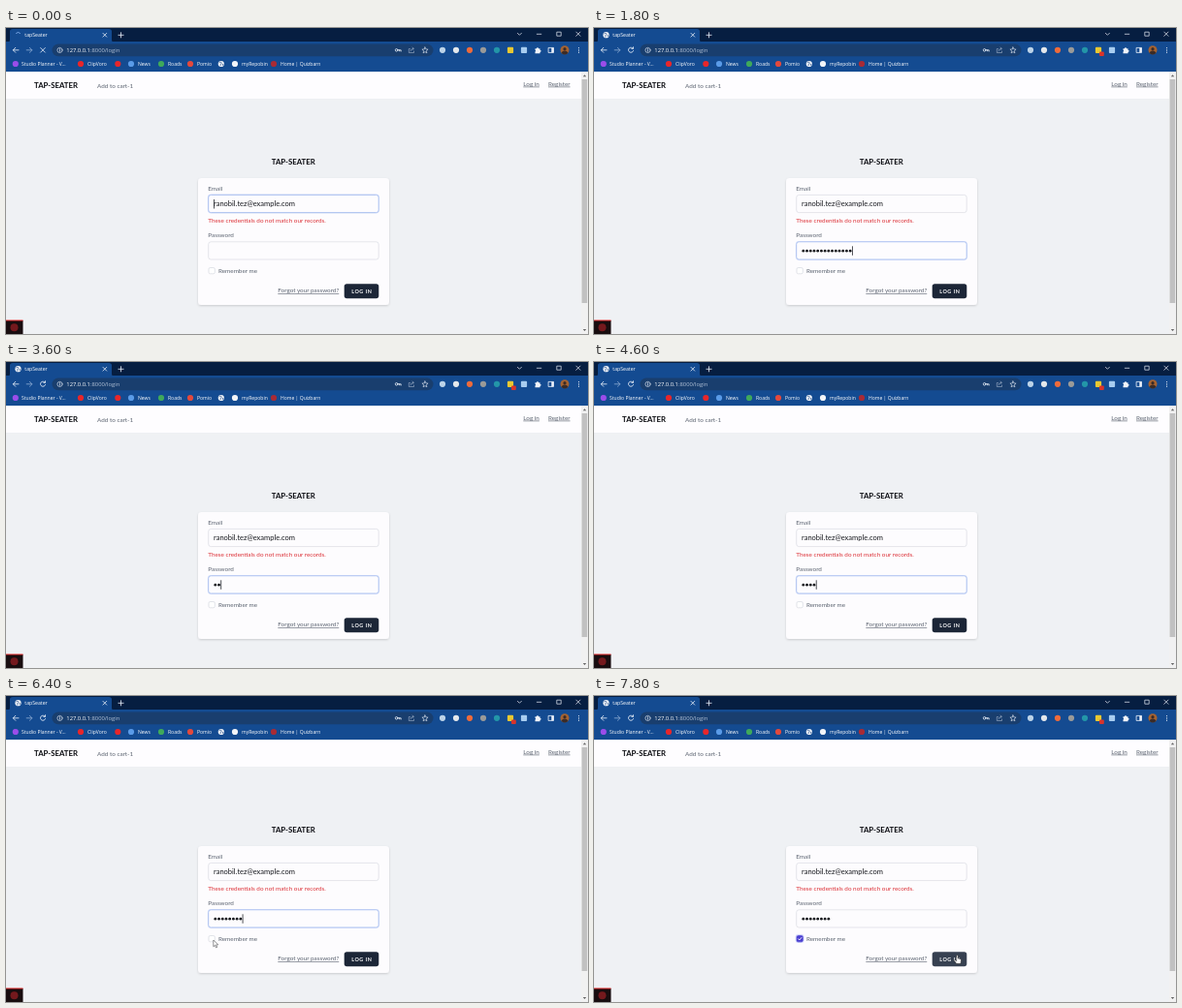
Recreate the animation shown at these times as an HTML page. Size 600x316 px, loop 8000 ms.

```html
<!DOCTYPE html>
<html lang="en">
<head>
<meta charset="utf-8">
<title>Login form</title>
<style>
html, body { margin: 0; width: 100%; height: 100%; overflow: hidden; background: #eff1f4; }
svg { display: block; width: 600px; height: 316px; }
text { font: 6.33px Lato, "Open Sans", sans-serif; fill: #5b6370; white-space: pre; }
.ui text { font: 500 5.05px "Open Sans", "Noto Sans", sans-serif; fill: #fff; }
.ui .tab { font-size: 5.2px; }
.ui .url { font-size: 5.84px; }
.line { fill: none; stroke: #eef3fb; stroke-width: .8; stroke-linecap: round; stroke-linejoin: round; }
.brand { font-size: 7.8px; font-weight: 700; fill: #0c0d12; }
.link { text-decoration: underline; text-decoration-thickness: .45px; }
.field { fill: #fdfcfe; stroke: #d3d6de; stroke-width: .6; }
.focus { stroke: #a9bff0; stroke-width: .9; }
.filled { fill: #e6eefb; }
</style>
</head>
<body>
<svg viewBox="0 0 600 316">
  <defs>
    <filter id="shadow" x="-5%" y="-5%" width="110%" height="115%">
      <feDropShadow dx="0" dy="1" stdDeviation="1.1" flood-opacity=".16"/>
    </filter>
    <g id="globe">
      <circle r="3.1" fill="#f4f7fb"/>
      <path d="M-2.3-1.2-.3-2 .6-.6-.8.3-.4 1.6-1.4 2M1 .6 2.2.4 1.5 1.9" fill="none" stroke="#3c5f96" stroke-width=".7"/>
    </g>
  </defs>

  <g class="ui">
    <rect width="600" height="15" fill="#061e41"/>
    <path d="M1 15q3 0 3-3V3.5Q4 1 7 1H106q3 0 3 2.5V12q0 3 3 3z" fill="#144b91"/>
    <rect y="14" width="600" height="31.3" fill="#144b91"/>
    <rect x="47.5" y="16.6" width="393" height="12.6" rx="6.3" fill="#193e6e"/>
    <g id="marks"></g>
    <use id="favicon" href="#globe" x="12.5" y="7.2"/>
    <path id="spin" class="line" d="M9.8 7.2A2.7 2.7 0 0 1 12.5 4.5" style="stroke:#8db9f5"/>
    <text class="tab" x="19.3" y="9">tapSeater</text>
    <text class="url" x="62.3" y="25.1">127.0.0.1<tspan fill="#b4c3d8">:8000/login</tspan></text>
    <g class="line">
      <path d="M100 5.4l3.7 3.7m0-3.7L100 9.1M118.5 4.7v5.2m-2.6-2.6h5.2"/>
      <path d="M13 22.8H7.4m2.4-2.5L7.3 22.8l2.5 2.5"/>
      <path d="M21.2 22.8h5.6m-2.4-2.5 2.5 2.5-2.5 2.5" stroke="#8fadd4"/>
      <path id="reload" d="M40.1 21a2.6 2.6 0 1 0 .5 2.5M40.5 19.7v1.7h-1.7"/>
      <path id="stop" d="M35.7 20.5l4.6 4.6m0-4.6-4.6 4.6"/>
      <circle cx="55.5" cy="22.9" r="2.6" stroke-width=".6"/>
      <path d="M55.5 22.6v1.6m0-2.8v.1" stroke-width=".7"/>
      <circle cx="402.6" cy="22.8" r="1.3"/>
      <path d="M404 22.8h3.2V24m-1.5-1.2v1"/>
      <path d="M416.5 21.5h-1.2v4h5.2V24M416.8 23.8q.3-2.4 3.3-2.5m-1.1-1.2 1.4 1.2-1.4 1.2" stroke="#a3b4cb" stroke-width=".6"/>
      <path d="M432 19.9l.9 2 2.2.2-1.7 1.5.5 2.2-1.9-1.2-1.9 1.2.5-2.2-1.7-1.5 2.2-.2z" stroke-width=".6"/>
      <path d="M527.4 5.3l2 2 2-2M547.3 6.3h4.5M568.2 4.2h4v4h-4zM587.8 4.1l4.2 4.2m0-4.2-4.2 4.2" stroke-width=".7"/>
      <path d="M559.5 20.4h5v5h-5z"/>
    </g>
    <path d="M562.3 20.4h2.2v5h-2.2z" fill="#eef3fb"/>
    <path d="M545.5 21.3h1.4a1.1 1.1 0 0 1 2.2 0h1.4v1.4a1.1 1.1 0 0 1 0 2.2v1.3h-5v-1.7a1 1 0 0 0 0-1.8z" fill="#f1f4f9"/>
    <rect id="badge" x="521" y="24.6" width="4.8" height="4.4" rx="1" fill="#d9342b"/>
    <circle cx="576" cy="22.8" r="4.5" fill="#a66331"/>
    <path d="M572.7 26q.3-2.5 3.3-2.5t3.3 2.5a4.5 4.5 0 0 1-6.6 0" fill="#3b2b26"/>
    <circle cx="576" cy="21.7" r="1.6" fill="#3b2b26"/>
    <path d="M590.5 20.5v.1m0 2.2v.1m0 2.2v.1" class="line" style="stroke-width:1.1"/>
  </g>

  <rect y="45.3" width="593" height="28" fill="#fefdff"/>
  <rect y="73" width="593" height=".5" fill="#e6e8ec"/>
  <rect x="593" y="45.3" width="7" height="271" fill="#f1f1f1"/>
  <rect x="593.6" y="53" width="5.6" height="231" fill="#c1c1c1"/>
  <path d="M594.8 50.3h3.4l-1.7-2zM594.8 311h3.4l-1.7 2z" fill="#626262"/>

  <text class="brand" x="29" y="62">TAP-SEATER</text>
  <text x="94" y="61.6">Add to cart-1</text>
  <text class="link" x="533.3" y="59.6">Log in</text>
  <text class="link" x="559" y="59.6">Register</text>
  <text class="brand" x="296.3" y="141" text-anchor="middle">TAP-SEATER</text>

  <rect x="198" y="155" width="197" height="131" rx="3.5" fill="#fdfcfe" filter="url(#shadow)"/>
  <text x="208.3" y="168.2">Email</text>
  <rect id="mailRing" x="207.9" y="171.6" width="177" height="19.8" rx="3.4" fill="#d8e1fa"/>
  <rect id="mail" class="field" x="208.7" y="172.4" width="175.5" height="18.2" rx="2.6"/>
  <text x="214" y="184.2" style="font-size:7.5px;fill:#15171c">ranobil.tez@example.com</text>
  <text x="208.3" y="200.6" style="fill:#dc2f35">These credentials do not match our records.</text>
  <text x="208.3" y="216.3">Password</text>
  <rect id="passRing" x="207.9" y="220" width="177" height="19.8" rx="3.4" fill="#d8e1fa"/>
  <rect id="pass" class="field" x="208.7" y="220.8" width="175.5" height="18.2" rx="2.6"/>
  <g id="dots" fill="#111318"></g>
  <rect id="caret" width=".8" height="9.5" fill="#24262c"/>

  <rect id="checkRing" x="207.7" y="246.2" width="8.8" height="8.8" rx="2.4" fill="#cdd1fa"/>
  <rect id="check" x="209" y="247.5" width="6.3" height="6.3" rx="1.6" stroke-width=".6"/>
  <path id="tick" d="M210.6 250.8l1.2 1.2 2.1-2.5" class="line" style="stroke:#fff;stroke-width:.9"/>
  <text x="219" y="252.8">Remember me</text>
  <text class="link" x="280.3" y="273.4">Forgot your password?</text>
  <rect id="button" x="348.7" y="264.2" width="35.6" height="15" rx="2.6"/>
  <text x="356.2" y="273.6" style="font-size:5.4px;font-weight:700;letter-spacing:.55px;fill:#fff">LOG IN</text>

  <rect y="302" width="17.5" height="14" fill="#180d0f"/>
  <rect y="301.5" width="17.5" height="1" fill="#e02a2a"/>
  <circle cx="8.5" cy="309.3" r="4" fill="#74191d"/>

  <path id="arrow" d="M0 0v6.8l1.6-1.4 1.1 2.5 1.2-.5-1.1-2.5h2.1z" fill="#fff" stroke="#4a4a4e" stroke-width=".6"/>
  <path id="hand" d="M-.8 0Q0-.9.8 0V3l2.4.6q1 .3.9 1.3L3.5 8.5H-.7L-3 5.6q-.2-1 .8-.9l1.4.9z" fill="#fff" stroke="#222" stroke-width=".6"/>
</svg>
<script>
const LOOP = 8000, STEP = 200;
const $ = id => document.getElementById(id);
const svg = (tag, attrs, parent = $('marks'), text = '') => {
  const el = document.createElementNS('http://www.w3.org/2000/svg', tag);
  for (const k in attrs) el.setAttribute(k, attrs[k]);
  el.textContent = text;
  return parent.appendChild(el);
};
const show = (id, on) => $(id).style.display = on ? '' : 'none';
const disc = (cx, cy, r, fill, parent) => svg('circle', { cx, cy, r, fill }, parent);
const square = (x, y, r, fill) => svg('rect', { x: x - r, y: y - r, width: 2 * r, height: 2 * r, rx: 1, fill });

// Bookmarks: icon x, colour, label x, label
[[9.8, '#9b4dea', 16, 'Studio Planner - V...'], [77, '#e8262a', 84, 'ClipVoro'], [115.3, '#e8262a'],
 [129, '#5a9be8', 136, 'News'], [160, '#3fa95b', 167, 'Roads'], [190, '#e3493c', 197, 'Pomio'],
 [236, '#f3f5f8', 243, 'myRepobin'], [276, '#a92b35', 283, 'Home | Quizbarn']
].forEach(([x, color, tx, label]) => {
  disc(x, 37, 3.1, color);
  if (label) svg('text', { x: tx, y: 38.8 }, $('marks'), label);
});
svg('use', { href: '#globe', x: 221.8, y: 37 });

// Toolbar extensions
['#bcd3e8', '#e4e8ec', '#ee6b3b', '#9a9a98', '#2396a8', '#e9c832', '#a8cdf0']
  .forEach((color, i) => (i < 5 ? disc : square)(450 + 14 * i, 22.8, 3.1, color));

// Value of the last [time, value] pair reached
const at = (list, t) => list.reduce((v, [start, next]) => t >= start ? next : v, list[0][1]);
const mix = (a, b, k) => a + (b - a) * k;
const along = (path, t) => {
  const i = path.findIndex(p => p[0] > t);
  if (i < 0) return path[path.length - 1].slice(1);
  const [a, b] = [path[i - 1], path[i]], k = (t - a[0]) / (b[0] - a[0]);
  return [mix(a[1], b[1], k), mix(a[2], b[2], k)];
};

const typed = [[0, 0], [600, 15], [1800, 14], [2800, 12], [3000, 10], [3200, 7], [3400, 4], [3600, 2],
  [3800, 0], [4000, 1], [4400, 3], [4600, 4], [4800, 6], [5200, 8]];
const blink = [[0, 1], [400, 0], [1000, 1], [1400, 0], [1800, 1], [2400, 0], [2800, 1], [5600, 0],
  [6200, 1], [6600, 0]];
const route = [[5800, 217, 302], [6400, 213.8, 252], [7200, 213.8, 252], [7400, 268, 258],
  [7600, 338, 264], [7800, 374.5, 268]];

let shown = '';
function setDots(count, gap, r) {
  const key = count + '/' + gap;
  if (key === shown) return;
  shown = key;
  $('dots').replaceChildren();
  for (let i = 0; i < count; i++) disc(215.8 + i * gap, 230.2, r, '#111318', $('dots'));
}

function draw(time) {
  const t = Math.floor(time % LOOP / STEP) * STEP;
  const loading = t < 600, inMail = t < 1800, checked = t >= 6600, inPass = !inMail && !checked;

  show('favicon', !loading);
  show('spin', loading);
  $('spin').setAttribute('transform', `rotate(${t * .45 + 45} 12.5 7.2)`);
  show('stop', loading);
  show('reload', !loading);
  show('badge', !loading);

  const count = at(typed, t), gap = inMail ? 2.08 : 3.72;
  setDots(count, gap, inMail ? .85 : 1.35);
  show('mailRing', inMail);
  show('passRing', inPass);
  $('mail').classList.toggle('focus', inMail);
  $('pass').classList.toggle('focus', inPass);
  $('pass').classList.toggle('filled', inMail && !loading);

  show('caret', at(blink, t));
  $('caret').setAttribute('x', inMail ? 214 : 213.9 + count * gap);
  $('caret').setAttribute('y', inMail ? 177 : 225.3);

  show('checkRing', checked);
  show('tick', checked);
  $('check').setAttribute('fill', checked ? '#4b3fd0' : '#fff');
  $('check').setAttribute('stroke', checked ? '#4b3fd0' : '#cfd2da');

  const moving = t >= 5800, [x, y] = moving ? along(route, t) : [0, 0], over = x > 348;
  show('arrow', moving && !over);
  show('hand', over);
  $(over ? 'hand' : 'arrow').setAttribute('transform', `translate(${x} ${y})`);
  $('button').setAttribute('fill', over ? '#374151' : '#1c2637');
}

const start = performance.now();
(function frame() {
  draw(performance.now() - start);
  requestAnimationFrame(frame);
})();
</script>
</body>
</html>
```
